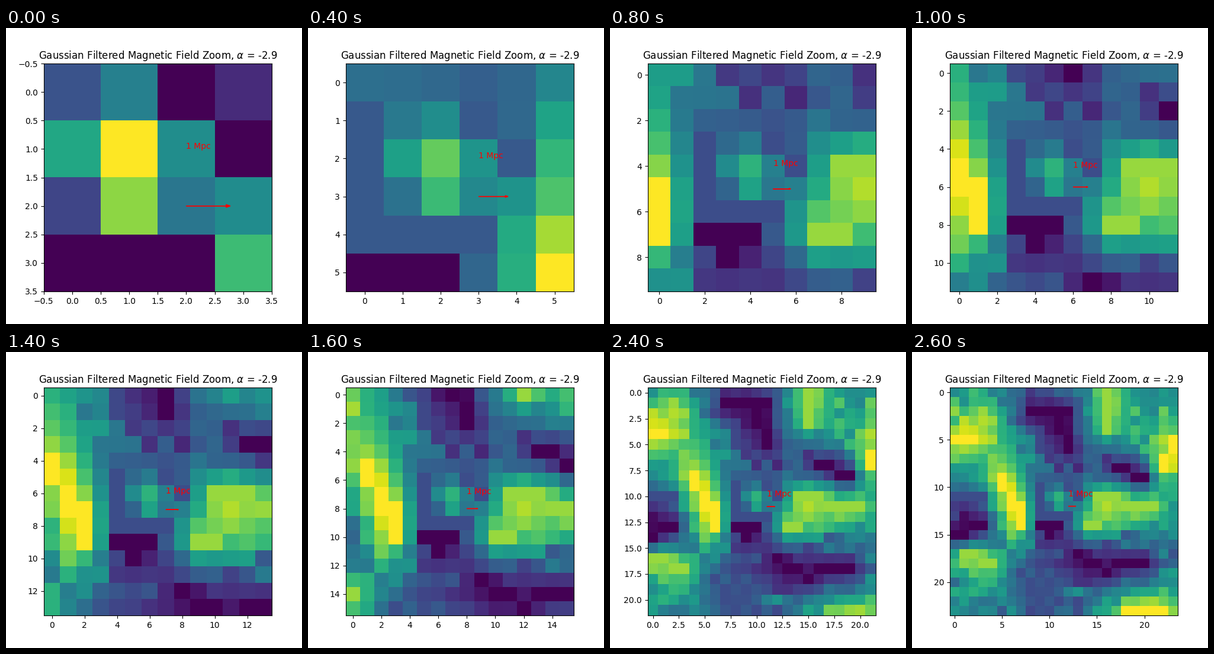
Write a matplotlib script that moves like this. It is 500x500 px and loops after 2.8 s.

```python
import numpy as np
import matplotlib.pyplot as plt
from matplotlib.animation import FuncAnimation

SIZE = 24
MID = SIZE // 2
MEAN = 42
REACH = 2
# Half the width of the view; three steps of the zoom hold for two ticks
HALF_WIDTHS = sorted([*range(2, MID + 1), 2, 6, 10])

# Streaks of equal field strength: level -> (row, col) to (row, col)
STREAKS = {
    90: [(5, 0, 5, 2), (9, 5, 12, 6), (12, 7, 14, 7), (5, 23, 8, 22), (23, 18, 23, 22)],
    77: [(2, 3, 3, 4), (11, 15, 12, 21), (14, 14, 14, 15), (17, 1, 18, 4), (0, 16, 4, 16)],
    25: [(10, 9, 13, 9), (19, 7, 23, 10), (11, 0, 11, 3), (13, 10, 13, 12), (10, 12, 11, 13)],
    5: [(2, 8, 2, 12), (3, 11, 6, 12), (14, 9, 14, 11), (17, 13, 19, 16),
        (8, 17, 9, 20), (18, 18, 18, 20), (15, 0, 14, 3)],
}
# Single cells around the centre
CORE = {(10, 10): 34, (11, 10): 46, (11, 11): 60, (12, 11): 54, (12, 13): 42, (13, 13): 49}


def cells(r0, c0, r1, c1):
    """Grid cells along a straight streak."""
    steps = max(abs(r1 - r0), abs(c1 - c0)) + 1
    line = np.linspace((r0, c0), (r1, c1), steps).round().astype(int)
    return map(tuple, line)


def distances(a, b):
    return np.linalg.norm(a[:, None] - b[None], axis=-1)


def make_field():
    """Interpolate between the known cells, with grain away from them."""
    known = dict(CORE)
    for level, streaks in STREAKS.items():
        for streak in streaks:
            known.update((cell, level) for cell in cells(*streak))
    points = np.array(list(known), float)
    values = np.array(list(known.values()), float)

    grid = np.indices((SIZE, SIZE)).reshape(2, -1).T
    gap = distances(grid, points)
    weights = np.linalg.solve(np.exp(-distances(points, points) / REACH), values - MEAN)
    field = MEAN + np.exp(-gap / REACH) @ weights

    grain = np.random.default_rng(4).normal(size=len(grid))
    field += grain * np.minimum(2.5 * gap.min(axis=1), 8)
    return field.reshape(SIZE, SIZE).clip(values.min(), values.max())


field = make_field()
fig, ax = plt.subplots(figsize=(5, 5), dpi=100)


def draw(i):
    half = HALF_WIDTHS[i]
    view = slice(MID - half, MID + half)
    ax.clear()
    ax.imshow(field[view, view], cmap="viridis")
    ax.arrow(half, half, 0.7, 0, head_width=0.05, color="red")
    ax.text(half, half - 1, "1 Mpc", color="red")
    ax.set_title(r"Gaussian Filtered Magnetic Field Zoom, $\alpha$ = -2.9")


anim = FuncAnimation(fig, draw, frames=len(HALF_WIDTHS), init_func=lambda: None,
                     interval=200, repeat=True, repeat_delay=0)
plt.show()
```
